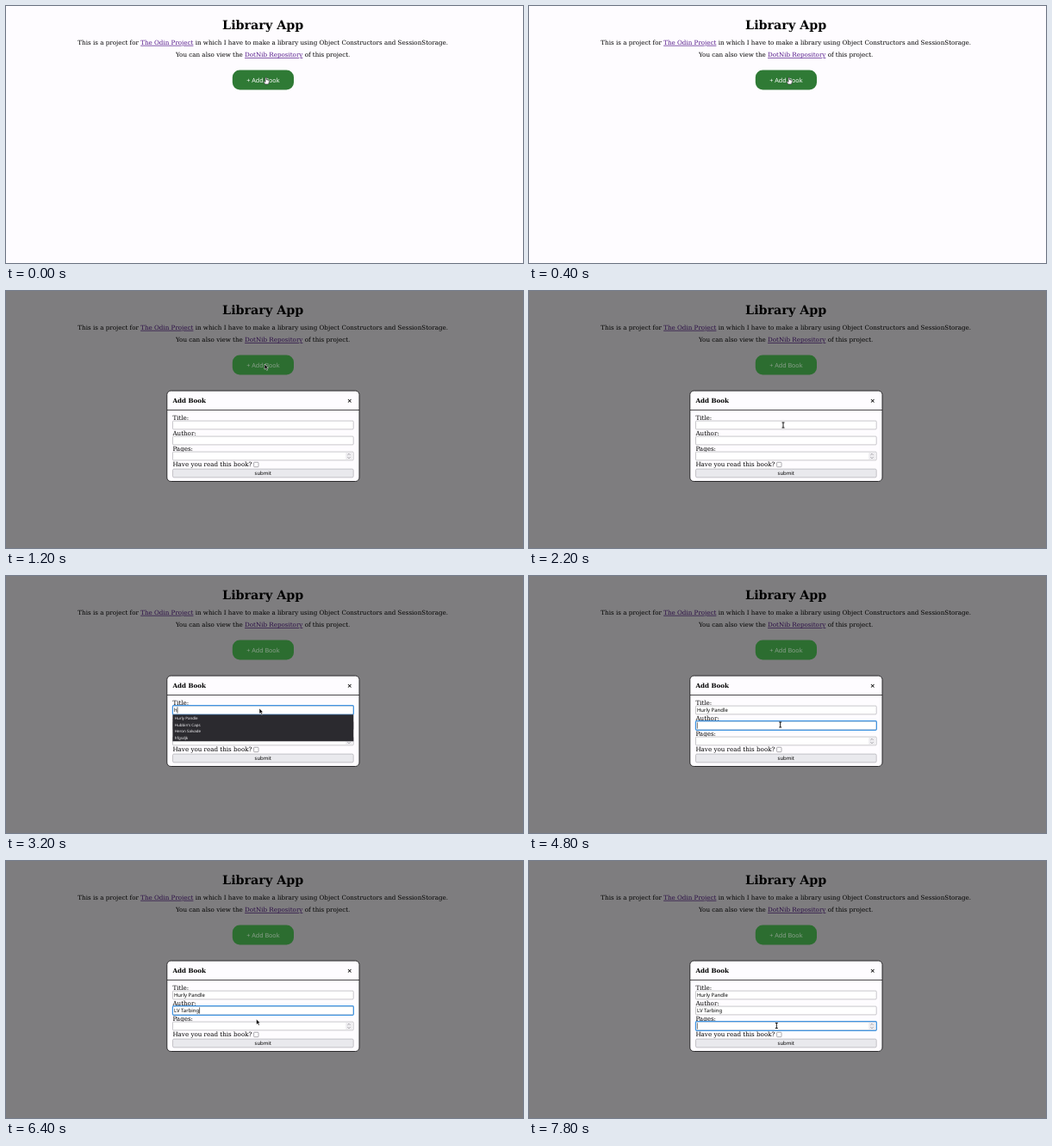
Write an HTML page that moves like this. It is 600 px wide and 299 px high and loops after 8 s.

```html
<!DOCTYPE html>
<html lang="en">
<head>
<meta charset="utf-8">
<title>Library App</title>
<style>
  html, body { margin: 0; width: 100%; height: 100%; overflow: hidden; background: #fefcff; }
  svg { display: block; width: 100%; height: 100%; }
  text { font: 7.15px "DejaVu Serif", serif; text-rendering: geometricPrecision; white-space: pre; }
  .mid { text-anchor: middle; }
  .bold { font-weight: bold; }
  .link { fill: #551a8b; text-decoration: underline; }
  .ui { font: 5.96px "Noto Sans", sans-serif; }
  .field { fill: #fff; stroke: #a3a1a8; stroke-width: .6; }
  #addText { font: 7.15px "Noto Sans", sans-serif; }
  #list text { font: 4.47px "Noto Sans", sans-serif; fill: #f4f3f6; }
  #ring { fill: none; stroke: #4295e2; stroke-width: 1.2; }
  #caret { stroke: #000; stroke-width: .6; }
</style>
</head>
<body>
<svg viewBox="0 0 600 299" preserveAspectRatio="none">
  <rect width="600" height="299" fill="#fefcff"/>
  <text class="mid bold" x="298.2" y="27.3" style="font-size:14.3px">Library App</text>
  <text class="mid" x="298.2" y="44.8">This is a project for <tspan class="link">The Odin Project</tspan> in which I have to make a library using Object Constructors and SessionStorage.</text>
  <text class="mid" x="298.2" y="59.3">You can also view the <tspan class="link">DotNib Repository</tspan> of this project.</text>
  <rect id="shade" width="600" height="299"/>

  <rect id="add" x="262.8" y="74.4" width="71.2" height="23.2" rx="8.5"/>
  <text id="addText" class="mid" x="298.4" y="88.8">+ Add Book</text>

  <g id="modal">
    <rect x="186.8" y="116.1" width="223.2" height="105.4" rx="4.5" fill="#fefcff" stroke="#1c1b1d" stroke-width=".9"/>
    <path d="M187 138.5H410" stroke="#1c1b1d" stroke-width=".8"/>
    <text class="bold" x="193.4" y="130">Add Book</text>
    <text class="mid bold" x="398.8" y="130">×</text>
    <text x="193.4" y="149.8">Title:</text>
    <text x="193.4" y="167.6">Author:</text>
    <text x="193.4" y="185.6">Pages:</text>
    <text x="193.4" y="204">Have you read this book?</text>
    <g class="field">
      <rect x="193.5" y="151.1" width="209.7" height="9.8" rx="1"/>
      <rect x="193.5" y="169.1" width="209.7" height="9.8" rx="1"/>
      <rect x="193.5" y="187.1" width="209.7" height="9.8" rx="1"/>
      <rect x="287.6" y="199.3" width="5.4" height="5.4" rx=".8" style="stroke:#77757c"/>
      <rect x="193.5" y="207.1" width="209.7" height="9.8" rx="1.5" style="fill:#e9e9ed"/>
    </g>
    <rect x="394.2" y="187.9" width="7.6" height="8.2" fill="#eeedf0"/>
    <path d="M396.4 190.9l1.6-1.6 1.6 1.6M396.4 193.2l1.6 1.6 1.6-1.6" fill="none" stroke="#77757c" stroke-width=".6"/>
    <text class="ui mid" x="298.3" y="214.2">submit</text>
    <text id="title" class="ui" x="194.9" y="158.2"></text>
    <text id="author" class="ui" x="194.9" y="176.2"></text>
    <rect id="ring" x="193.4" width="210" height="10.6" rx="1.2"/>
    <path id="caret" d="M0 -3.6V3.6"/>
    <g id="list">
      <rect x="193.4" y="161.3" width="209.9" height="31" fill="#2b2a2f"/>
      <rect id="pick" x="193.4" y="162" width="209.9" height="7.5" fill="#47464e"/>
      <text x="195.8" y="167.3">Hurly Pandle</text>
      <text x="195.8" y="174.8">Hubbin's Caps</text>
      <text x="195.8" y="182.3">Heron Salvade</text>
      <text x="195.8" y="189.8">hfgsdjk</text>
    </g>
  </g>

  <g id="mouse" stroke-linejoin="round">
    <path id="hand" d="M-1 -3.2h1.3v2.4l3 .8v2.4l-.9 2H-1.2L-3 1.8l.7-.7 1.3 1z" fill="#fff" stroke="#3a2a3c" stroke-width=".6"/>
    <path id="arrow" d="M0 0V6.2L1.5 4.9 2.6 7.3 3.7 6.8 2.6 4.5H4.5z" fill="#000" stroke="#fff" stroke-width=".5"/>
    <path id="beam" d="M-1.5 -3H1.5M0 -3V3M-1.5 3H1.5" fill="none" stroke="#000" stroke-width=".9"/>
  </g>
</svg>
<script>
const LOOP = 8000, STEP = 200;
const el = id => document.getElementById(id);
const show = (id, on) => el(id).setAttribute('visibility', on ? 'visible' : 'hidden');
const set = (id, attr, value) => el(id).setAttribute(attr, value);

// time, x, y, pointer shape
const path = [
  [0, 302, 86.5, 'hand'], [1000, 300, 85, 'arrow'], [1200, 300, 85, 'arrow'],
  [2000, 296, 151, 'arrow'], [2200, 295, 156, 'beam'], [2600, 294, 156, 'beam'],
  [3200, 294, 154, 'arrow'], [3400, 294, 154, 'arrow'], [3800, 291, 163, 'arrow'],
  [4200, 291, 164, 'arrow'], [4600, 291.5, 171, 'beam'], [4800, 291.7, 173, 'beam'],
  [6200, 291.7, 173, 'beam'], [6400, 290.5, 184, 'arrow'], [6800, 289, 189, 'beam'],
  [7400, 288, 191, 'beam'], [7800, 287.3, 191.5, 'beam']
];

function pointer(t) {
  let i = path.length - 1;
  while (path[i][0] > t) i--;
  const a = path[i], b = path[i + 1] || a;
  const k = a[3] === 'hand' || a === b ? 0 : (t - a[0]) / (b[0] - a[0]);
  return { x: a[1] + (b[1] - a[1]) * k, y: a[2] + (b[2] - a[2]) * k, kind: a[3] };
}

function draw(t) {
  const open = t < 1000 ? 0 : t < 1200 ? 0.72 : 1;
  set('shade', 'opacity', open * 0.5);
  set('modal', 'transform', `translate(298.4 168.8) scale(${open}) translate(-298.4 -168.8)`);
  show('modal', open);
  set('add', 'fill', open ? open < 1 ? '#2e7031' : '#2c6d30' : '#2f7a35');
  set('addText', 'fill', open ? open < 1 ? '#9dbb9f' : '#8a9f8b' : '#fff');

  const author = 'LV Tarbing';
  const typed = Math.max(0, Math.ceil((t - 5000) / 1200 * author.length));
  el('title').textContent = t < 3200 ? '' : t < 4200 ? 'h' : 'Hurly Pandle';
  el('author').textContent = author.slice(0, typed);

  const row = t < 2400 ? -1 : t < 4800 ? 0 : t < 7400 ? 1 : 2;
  const input = row === 0 ? el('title') : row === 1 ? el('author') : null;
  const textWidth = input && input.textContent ? input.getComputedTextLength() : 0;
  show('ring', row >= 0);
  show('caret', row >= 0);
  set('ring', 'y', 150.7 + row * 18);
  set('caret', 'transform', `translate(${195.3 + textWidth} ${156 + row * 18})`);

  const listed = t >= 3200 && t < 4200;
  show('list', listed);
  show('pick', listed && t >= 3800);

  const p = pointer(t);
  set('mouse', 'transform', `translate(${p.x} ${p.y})`);
  for (const kind of ['hand', 'arrow', 'beam']) show(kind, kind === p.kind);
}

const start = performance.now();
function tick() {
  const t = (performance.now() - start) % LOOP;
  draw(Math.floor(t / STEP) * STEP);
  requestAnimationFrame(tick);
}
tick();
</script>
</body>
</html>
```
